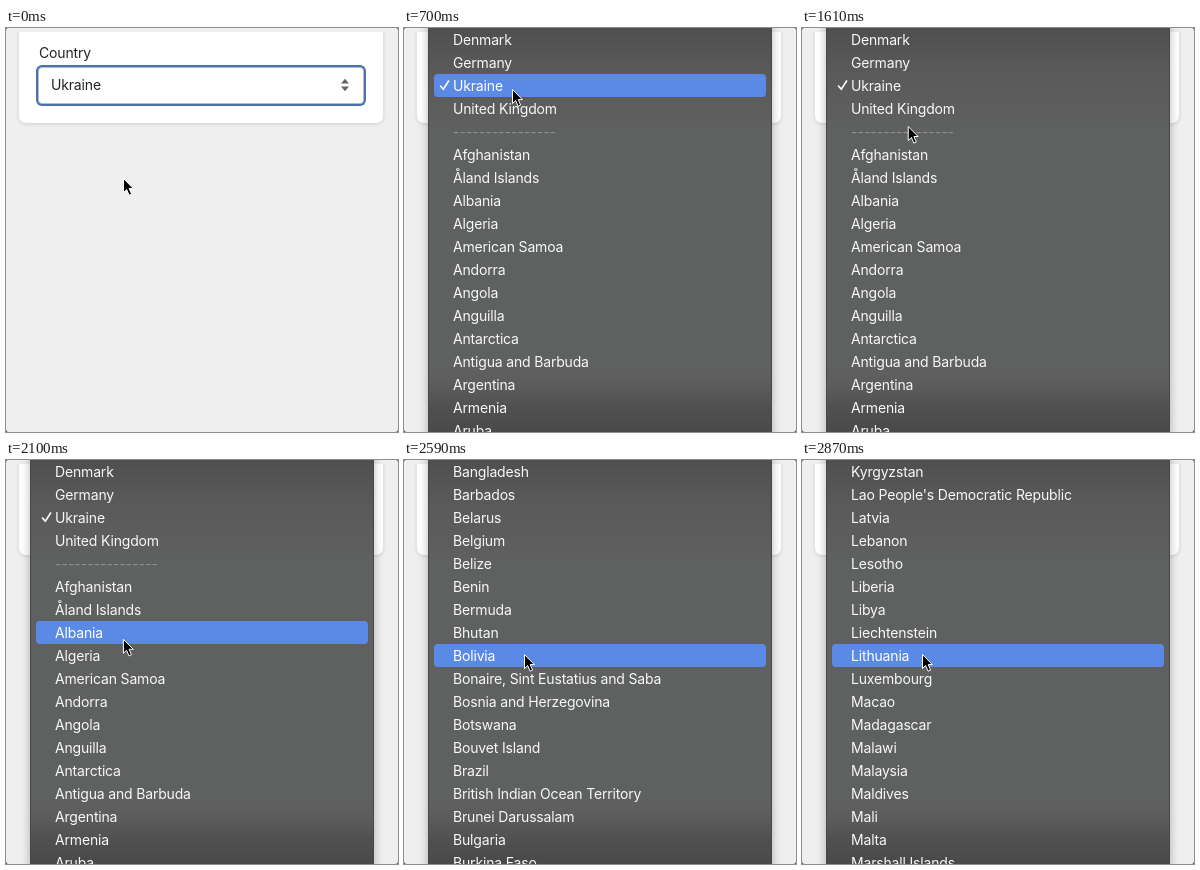
An HTML page for the animation above (2940 ms loop, 392x404 px).

```html
<!DOCTYPE html>
<html lang="en">
<head>
<meta charset="utf-8">
<title>Country select</title>
<style>
html, body { margin: 0; width: 100%; height: 100%; overflow: hidden; background: #555; }
#stage {
  position: relative; width: 392px; height: 404px; overflow: hidden;
  background: #efefef; border-radius: 3px; color: #222;
  font: 14px/23px Inter, Roboto, sans-serif; letter-spacing: -.012em;
}
#stage div, #stage svg { position: absolute; box-sizing: border-box; }
#card {
  left: 13px; top: -6px; width: 364px; height: 101px; background: #fff;
  border-radius: 7px; box-shadow: 0 1px 4px rgba(0, 0, 0, .13);
}
#bar { left: 0; top: 0; width: 392px; height: 4px; background: #efefef; }
#label { left: 33px; top: 13px; }
#field {
  left: 32px; top: 39px; width: 326px; height: 37px; line-height: 33px;
  padding-left: 12px; background: #fff; border: 1px solid #adc0d3;
  border-radius: 4px; box-shadow: 0 0 0 2px #4a72a8;
}
#arrows { left: 334px; top: 50px; }
#menu {
  left: 24px; top: -20px; width: 344px; height: 444px;
  border: 1px solid #484848; border-width: 0 1px;
  background: linear-gradient(#4f4f4f 20px, #595959 60px, #5f6060 125px, #5f6060 360px, #5c5c5c 378px, #505050 400px, #494949 424px);
  box-shadow: 0 0 9px rgba(0, 0, 0, .28);
}
.row {
  left: 5px; width: 332px; height: 23px; padding-left: 19px;
  border-radius: 4px; color: #f8f8f8; white-space: nowrap;
}
.row.sep { color: #8f8f8f; letter-spacing: 0; }
.row.on { background: #5b8ae6; color: #fff; }
#tick { left: 9px; }
#ring, #cursor { left: 0; top: 0; overflow: visible; }
</style>
</head>
<body>
<div id="stage">
  <div id="card"></div>
  <div id="bar"></div>
  <div id="label">Country</div>
  <div id="field">Ukraine</div>
  <svg id="arrows" width="10" height="14" fill="#666"><path d="M1 5.5 5 .8 9 5.5zM1 8.5 5 13.2 9 8.5z"/></svg>
  <div id="menu">
    <svg id="tick" width="14" height="14" fill="none" stroke="#fff" stroke-width="1.6" stroke-linecap="round" stroke-linejoin="round"><path d="M2.5 8 5.3 11.3 10.6 3"/></svg>
  </div>
  <svg id="ring" width="1" height="1" fill="none"><circle cx="1" r="22.4" stroke="#fff" stroke-width="1"/><circle cx="1" r="21.2" stroke="#111" stroke-width="1.6"/></svg>
  <svg id="cursor" width="1" height="1"><path d="M.5 .6V14.6L3.7 11.6 6.1 17.2 8.6 16.1 6.2 10.6H10.4z" fill="#000" stroke="#fff" stroke-width="1"/></svg>
</div>
<script>
const LOOP = 2940, TICK = 70, ROW = 23, ROWS = 18;
const OPEN = 700, CHECKED = 2, SEP = 4;

const names = `Denmark|Germany|Ukraine|United Kingdom|----------------|Afghanistan|Åland Islands|Albania|Algeria|American Samoa|Andorra|Angola|Anguilla|Antarctica|Antigua and Barbuda|Argentina|Armenia|Aruba|Austria|Azerbaijan|Bahamas|Bahrain|Bangladesh|Barbados|Belarus|Belgium|Belize|Benin|Bermuda|Bhutan|Bolivia|Bonaire, Sint Eustatius and Saba|Bosnia and Herzegovina|Botswana|Bouvet Island|Brazil|British Indian Ocean Territory|Brunei Darussalam|Bulgaria|Burkina Faso|Burundi|Cabo Verde|Cambodia|Cameroon|Canada|Cayman Islands|Central African Republic|Chad|Chile|China|Christmas Island|Cocos (Keeling) Islands|Colombia|Comoros|Congo|Congo, Democratic Republic of the|Cook Islands|Costa Rica|Côte d'Ivoire|Croatia|Cuba|Curaçao|Cyprus|Czechia|Djibouti|Dominica|Dominican Republic|Ecuador|Egypt|El Salvador|Equatorial Guinea|Eritrea|Estonia|Eswatini|Ethiopia|Falkland Islands (Malvinas)|Faroe Islands|Fiji|Finland|France|French Guiana|French Polynesia|French Southern Territories|Gabon|Gambia|Georgia|Ghana|Gibraltar|Greece|Greenland|Grenada|Guadeloupe|Guam|Guatemala|Guernsey|Guinea|Guinea-Bissau|Guyana|Haiti|Heard Island and McDonald Islands|Holy See|Honduras|Hong Kong|Hungary|Iceland|India|Indonesia|Iran|Iraq|Ireland|Isle of Man|Israel|Italy|Jamaica|Japan|Jersey|Jordan|Kazakhstan|Kenya|Kiribati|Kuwait|Kyrgyzstan|Lao People's Democratic Republic|Latvia|Lebanon|Lesotho|Liberia|Libya|Liechtenstein|Lithuania|Luxembourg|Macao|Madagascar|Malawi|Malaysia|Maldives|Mali|Malta|Marshall Islands`.split('|');

const smooth = p => p * p * (3 - 2 * p);
const settle = p => 1 - (1 - p) ** 1.75;

// Pointer moves: start, end, from, to, easing
const moves = [
  [0, 560, [117, 150], [108, 61], smooth],
  [1190, 1750, [108, 61], [105.5, 101.5], settle],
  [1890, 2170, [105.5, 101.5], [119, 193], smooth],
  [2310, 2520, [119, 193], [120, 194], smooth],
];
const clicks = [[630, 700], [1820, 1960]];
// First visible row, one entry per tick from the start of the scroll
const SCROLL = 2310;
const offsets = [1, 2, 5, 11, 22, 57, 81, 102, 121];

const $ = id => document.getElementById(id);
const menu = $('menu'), tick = $('tick'), ring = $('ring'), cursor = $('cursor');
const rows = Array.from({ length: ROWS }, (_, i) => {
  const el = document.createElement('div');
  el.style.top = 20 + i * ROW + 'px';
  menu.insertBefore(el, tick);
  return el;
});

const place = (el, [x, y]) => { el.style.transform = `translate(${x}px, ${y}px)`; };

function pointer(t) {
  let pos = moves[0][2];
  for (const [start, end, a, b, ease] of moves) {
    if (t < start) break;
    const k = ease(Math.min(1, (t - start) / (end - start)));
    pos = a.map((v, i) => v + (b[i] - v) * k);
  }
  return pos;
}

function draw(t) {
  const pos = pointer(t);
  place(cursor, pos);
  place(ring, pos);
  ring.style.display = clicks.some(([a, b]) => t >= a && t < b) ? '' : 'none';

  menu.style.display = t >= OPEN ? '' : 'none';
  const first = t < SCROLL ? 0 : offsets[Math.min(offsets.length - 1, (t - SCROLL) / TICK)];
  const hover = Math.floor((pos[1] - 1) / ROW);
  rows.forEach((el, i) => {
    const n = first + i;
    el.textContent = names[n];
    el.className = 'row' + (n === SEP ? ' sep' : i === hover ? ' on' : '');
  });
  tick.style.top = 24 + (CHECKED - first) * ROW + 'px';
  tick.style.display = first > CHECKED ? 'none' : '';
}

const begin = performance.now();
function frame() {
  const t = (performance.now() - begin + 1) % LOOP;
  draw(Math.floor(t / TICK) * TICK);
  requestAnimationFrame(frame);
}
frame();
</script>
</body>
</html>
```
